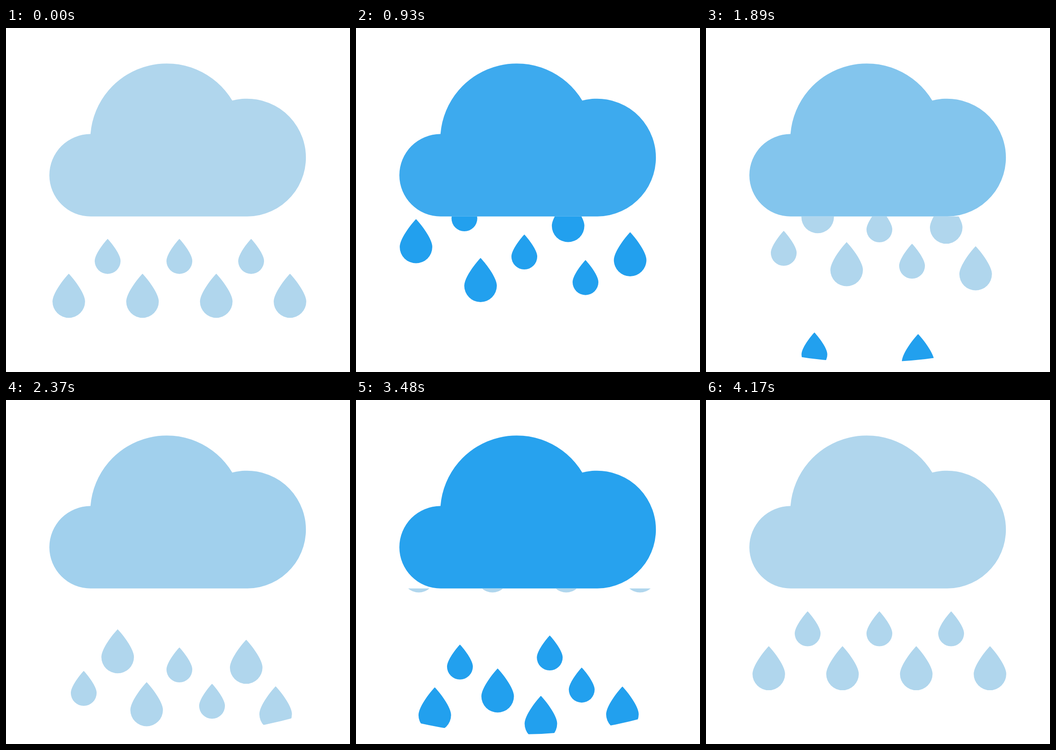
An HTML page for the animation above (4.2 s loop, 748x748 px).

```html
<!DOCTYPE html>
<html lang="en">
<head>
<meta charset="utf-8">
<title>Rain cloud</title>
<style>
  html, body { margin: 0; height: 100%; overflow: hidden; background: #fff; }
  svg { display: block; width: 100%; height: 100%; }
</style>
</head>
<body>
<svg viewBox="0 0 748 748">
  <defs>
    <clipPath id="sky"><path d="M0 409.7V661.9A1020 1020 0 0 0 748 649.3V409.7Z"/></clipPath>
    <path id="drop" d="M0 0C-12 12.5 -35.4 43 -35.4 60.5A35.4 35.4 0 0 0 35.4 60.5C35.4 43 12 12.5 0 0Z"/>
  </defs>
  <path id="cloud" d="M184 409.7A89.6 89.6 0 0 1 183.7 230.5A166.3 166.3 0 0 1 492 157.8A128 128 0 1 1 525 409.7Z"/>
  <g id="rain" clip-path="url(#sky)"></g>
</svg>
<script>
const LOOP = 4200, STEP = 30, CYCLE = 4167, SPEED = 0.3083, SMALL = 0.793;
const LIGHT = [176, 214, 237], BLUE = [34, 160, 238];
const NS = 'http://www.w3.org/2000/svg';
const cloud = document.getElementById('cloud');
const rain = document.getElementById('rain');
const rgb = c => `rgb(${c.map(Math.round)})`;

// Each shower: the time at which its drops have the given [x, tip y].
const start = {
  color: LIGHT,
  big: [[136.5, 534.3], [296.8, 534.3], [457.2, 534.3], [617.5, 534.3]],
  small: [[221, 458.6], [377, 458.6], [533, 458.6]]
};
const showers = [
  { ...start, at: 0 },
  { at: 930, color: BLUE,
    big: [[130.5, 415.6], [270.8, 500], [461.2, 369.6], [596.1, 444]],
    small: [[235.7, 366], [366, 449], [499, 504.6]] },
  { at: 1890, color: LIGHT,
    big: [[242.8, 350.4], [305.8, 465.6], [522.3, 373.2], [586.3, 474.6]],
    small: [[169, 441], [377, 390], [448, 469]] },
  { at: 2850, color: BLUE,
    big: [[171.3, 430.5], [308, 389.4], [402, 449.1], [579.3, 428.7]],
    small: [[226, 337.5], [421.3, 317.8], [490.8, 387.6]] },
  { ...start, at: CYCLE }
];

function addDrop(group, [x, y], scale) {
  const use = document.createElementNS(NS, 'use');
  use.setAttribute('href', '#drop');
  use.setAttribute('transform', `translate(${x} ${y}) scale(${scale})`);
  group.append(use);
}

for (const s of showers) {
  s.group = document.createElementNS(NS, 'g');
  s.group.setAttribute('fill', rgb(s.color));
  s.big.forEach(p => addDrop(s.group, p, 1));
  s.small.forEach(p => addDrop(s.group, p, SMALL));
  rain.append(s.group);
}

// Cloud tint alternates between light and blue at these times.
const turns = [0, 1145, 2240, 3455, CYCLE, CYCLE + 1145];

function tint(t) {
  const i = turns.findIndex(end => t < end) - 1;
  const k = (t - turns[i]) / (turns[i + 1] - turns[i]);
  const mix = i % 2 ? 1 - k : k;
  return LIGHT.map((c, n) => c + (BLUE[n] - c) * mix);
}

function draw(now) {
  const t = Math.floor(now % LOOP / STEP) * STEP;
  cloud.setAttribute('fill', rgb(tint(t)));
  for (const s of showers) {
    s.group.setAttribute('transform', `translate(0 ${(t - s.at) * SPEED})`);
  }
}

let first;
function tick(now) {
  first ??= now;
  draw(now - first);
  requestAnimationFrame(tick);
}
draw(0);
requestAnimationFrame(tick);
</script>
</body>
</html>
```
